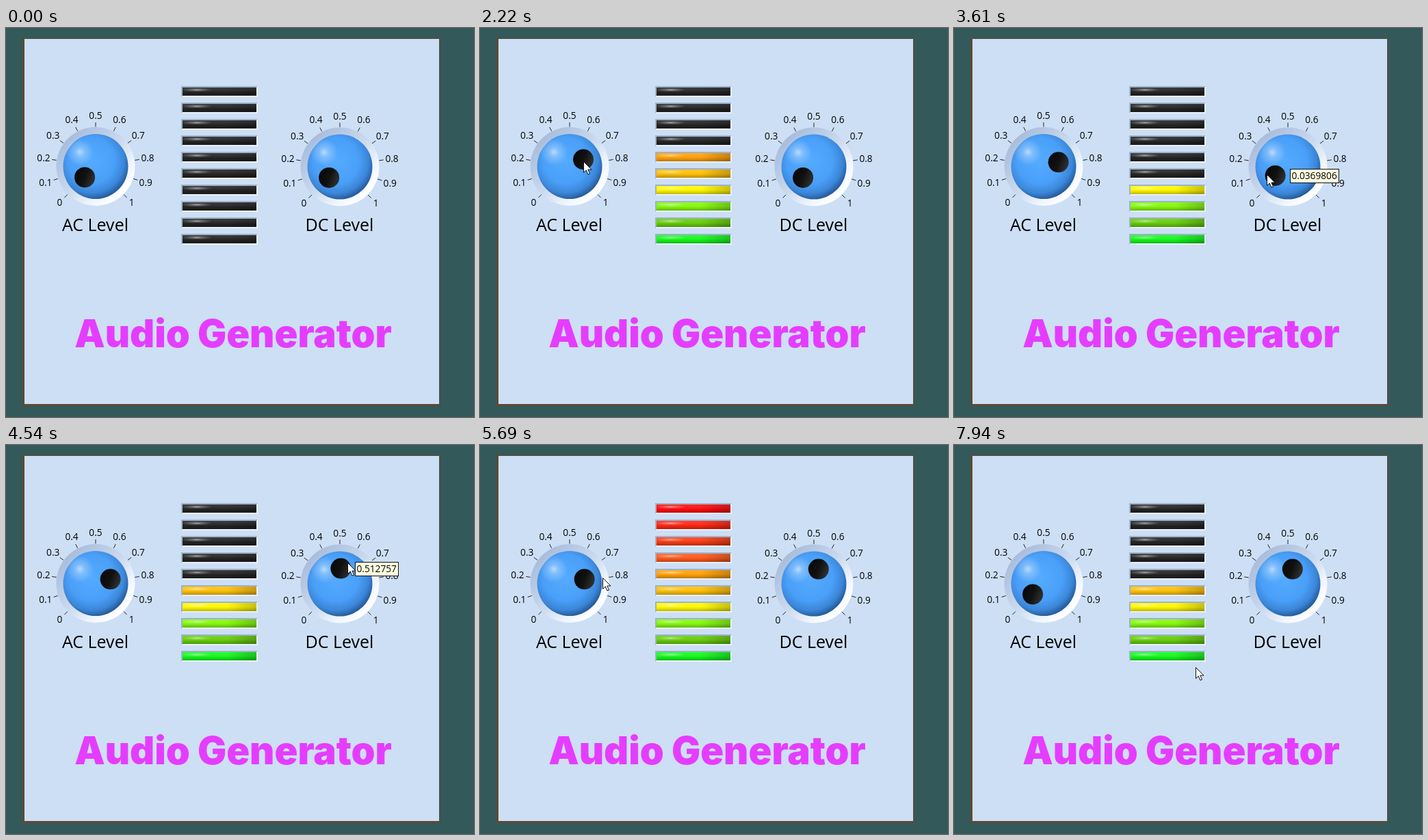
Recreate the animation shown at these times as an HTML page. Size 684 px wide and 569 px high, loop 8000 ms.

```html
<!DOCTYPE html>
<html lang="en">
<head>
<meta charset="utf-8">
<title>Audio Generator</title>
<style>
  html, body { margin: 0; width: 100%; height: 100%; overflow: hidden; background: #33595a; }
  svg { display: block; font-family: "Open Sans", "Noto Sans", sans-serif; }
  .scale, .tip { font-size: 13.7px; }
  .scale { text-anchor: middle; }
  .name { font-size: 25px; text-anchor: middle; }
  .title { font: 900 56px Inter, sans-serif; text-anchor: middle; fill: #e53dff; }
</style>
</head>
<body>
<svg id="stage" width="684" height="569" viewBox="0 0 684 569">
  <defs>
    <linearGradient id="bezel" x1=".15" y1=".15" x2=".85" y2=".85">
      <stop offset="0" stop-color="#a9bddb"/>
      <stop offset=".5" stop-color="#cbdaef"/>
      <stop offset=".8" stop-color="#f1f6fd"/>
      <stop offset="1" stop-color="#fff"/>
    </linearGradient>
    <radialGradient id="ball" cx=".44" cy=".41" r=".61">
      <stop offset="0" stop-color="#55abff"/>
      <stop offset=".58" stop-color="#4a9ff8"/>
      <stop offset=".82" stop-color="#3b86d8"/>
      <stop offset="1" stop-color="#225693"/>
    </radialGradient>
    <radialGradient id="shine">
      <stop offset="0" stop-color="#fff" stop-opacity=".6"/>
      <stop offset=".35" stop-color="#fff" stop-opacity=".28"/>
      <stop offset="1" stop-color="#fff" stop-opacity="0"/>
    </radialGradient>
    <linearGradient id="hole" x2="1" y2=".4">
      <stop offset="0" stop-color="#050607"/>
      <stop offset=".6" stop-color="#111"/>
      <stop offset="1" stop-color="#2c2d2f"/>
    </linearGradient>
    <linearGradient id="gloss" x2="0" y2="1">
      <stop offset="0" stop-color="#fff" stop-opacity=".12"/>
      <stop offset=".45" stop-color="#fff" stop-opacity=".04"/>
      <stop offset=".6" stop-color="#000" stop-opacity=".04"/>
      <stop offset="1" stop-color="#000" stop-opacity=".26"/>
    </linearGradient>
    <linearGradient id="fade">
      <stop offset=".6" stop-color="#000" stop-opacity="0"/>
      <stop offset="1" stop-color="#000" stop-opacity=".22"/>
    </linearGradient>
  </defs>
  <path d="M24 13H636V553H24Z" fill="#45524b"/>
  <path d="M24 15H27V550H634V553H24Z" fill="#5c4a35"/>
  <rect x="27" y="16" width="606" height="534" fill="#cddff5"/>
  <text class="title" x="332" y="466.5">Audio Generator</text>
</svg>
<script>
const STEP = 77.3, LOOP = 8000;
const LIT = ['#13f81c', '#66cc0a', '#84f80c', '#fff700', '#ffc008',
             '#ffa008', '#ff5a1c', '#f83c12', '#ff2611', '#ff0d0d'];
const stage = document.getElementById('stage');

function add(tag, attrs, parent = stage) {
  const node = document.createElementNS('http://www.w3.org/2000/svg', tag);
  for (const key in attrs) node.setAttribute(key, attrs[key]);
  parent.append(node);
  return node;
}

function label(className, x, y, text, parent) {
  const node = add('text', { class: className, x, y }, parent);
  node.textContent = text;
  return node;
}

// Dial values 0..1 sweep 270 degrees, with 0.5 pointing up.
function polar(value, radius, cx = 0, cy = 0) {
  const angle = (value - 0.5) * 1.5 * Math.PI;
  return [cx + radius * Math.sin(angle), cy - radius * Math.cos(angle)];
}

// Keys are [step, ...values], interpolated linearly and held at both ends.
function sample(keys, step) {
  const next = keys.findIndex(key => key[0] > step);
  if (next === 0) return keys[0].slice(1);
  if (next < 0) return keys[keys.length - 1].slice(1);
  const a = keys[next - 1], b = keys[next];
  const p = (step - a[0]) / (b[0] - a[0]);
  return a.slice(1).map((v, i) => v + (b[i + 1] - v) * p);
}

function makeKnob(cx, cy, name, turns) {
  const g = add('g', { transform: `translate(${cx} ${cy})` });
  for (let i = 0; i <= 10; i++) {
    const [x1, y1] = polar(i / 10, 58), [x2, y2] = polar(i / 10, 64.5);
    add('line', { x1, y1, x2, y2, stroke: '#222' }, g);
    const [x, y] = polar(i / 10, i % 5 ? 77 : 74.5);
    label('scale', x, y + 5, i / 10, g);
  }
  add('circle', { r: 57.5, fill: 'url(#bezel)' }, g);
  add('circle', { r: 47.5, fill: 'url(#ball)' }, g);
  add('circle', { cx: -23, cy: -21, r: 20, fill: 'url(#shine)' }, g);
  const hole = add('circle', { r: 15, fill: 'url(#hole)' }, g);
  label('name', cx - 0.5, 297, name);

  const valueAt = step => sample(turns, step)[0];
  return {
    valueAt,
    turn(value) {
      const [x, y] = polar(value, 22.5);
      hole.setAttribute('cx', x);
      hole.setAttribute('cy', y);
      return [cx + x, cy + y];
    },
    // Cursor keys for a drag that follows the dial around its centre.
    drag(from, to, radius, lead) {
      return Array.from({ length: to - from + 1 }, (_, i) =>
        [from + i, ...polar(valueAt(from + i) + lead, radius, cx, cy)]);
    }
  };
}

function makeLed(color, i) {
  const y = 309 - 24 * i, box = { x: 258, y: y - 6, width: 108, height: 12 };
  add('rect', { x: 256, y: y - 8, width: 112, height: 16, fill: '#e9f1fc' });
  add('path', { d: `M256 ${y + 8}V${y - 8}H368L366 ${y - 6}H258V${y + 6}Z`, fill: '#9db2cf' });
  const base = add('rect', box);
  add('rect', { ...box, fill: 'url(#gloss)' });
  add('rect', { ...box, fill: 'url(#fade)' });
  add('ellipse', { cx: 279, cy: y - 2.5, rx: 22, ry: 3, fill: 'url(#shine)' });
  return on => base.setAttribute('fill', on ? color : '#242424');
}

const ac = makeKnob(131, 202.5, 'AC Level',
  [[13, 0], [26, .733], [28, .774], [72, .774], [82, .185], [90, 0]]);
const dc = makeKnob(488, 203, 'DC Level',
  [[42, 0], [44, .0369806], [56, .512757], [58, .565]]);
const leds = LIT.map(makeLed);

const tip = add('g');
const tipBox = add('rect', { x: 0.5, y: 0.5, height: 20, fill: '#ffffe1', stroke: '#111' }, tip);
const tipText = label('tip', 2.5, 15, '', tip);
const cursor = add('path', {
  d: 'M0 0V16L3.8 12.5L6.4 18.7L9 17.6L6.4 11.6H11.5Z', fill: '#fff', stroke: '#111'
});

// Enter, turn AC, turn DC, turn AC back, leave.
const cursorPath = [
  [0, 534, 552], ...ac.drag(10, 29, 21, .02),
  [34, 388, 240], ...dc.drag(43, 60, 33, .058),
  [67, 254, 180], ...ac.drag(71, 90, 49, .022),
  [100, 353, 325]
];

function draw(time) {
  const step = Math.floor((time % LOOP - 200) / STEP);
  const acValue = ac.valueAt(step), dcValue = dc.valueAt(step);
  ac.turn(acValue);
  const [holeX, holeY] = dc.turn(dcValue);

  // The meter shows a rectified sine on top of the DC offset.
  const wave = Math.abs(Math.sin(Math.PI * (step - 56) / 5.56));
  const lit = Math.floor(10 * (dcValue + acValue * wave));
  leds.forEach((setLed, i) => setLed(i < lit));

  const text = String(Number(dcValue.toPrecision(6)));
  tipText.textContent = text;
  tipBox.setAttribute('width', 8 * text.length - 1);
  tip.style.display = step >= 43 && step < 60 ? '' : 'none';
  tip.setAttribute('transform', `translate(${Math.round(holeX + 21)} ${Math.round(holeY - 10)})`);

  const [x, y] = sample(cursorPath, step).map(Math.round);
  cursor.style.display = step < 0 ? 'none' : '';
  cursor.setAttribute('transform', `translate(${x + 0.5} ${y + 0.5})`);
}

const start = performance.now();
function tick() {
  draw(performance.now() - start);
  requestAnimationFrame(tick);
}
tick();
</script>
</body>
</html>
```
